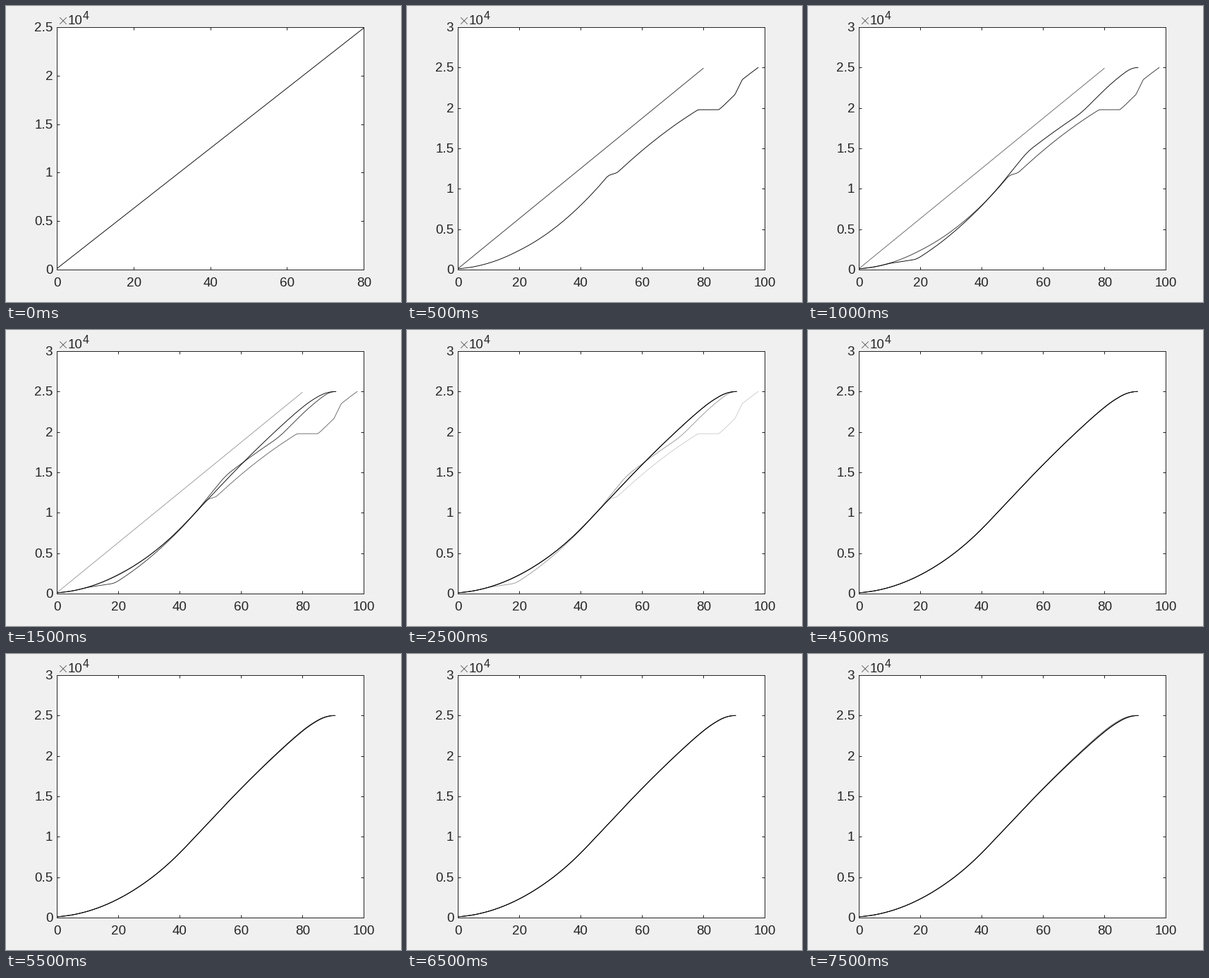
Animation of 560x420 px, one loop 8000 ms. Source, as a matplotlib script:

```python
import numpy as np
import matplotlib.pyplot as plt
from matplotlib.animation import FuncAnimation

W, H, DPI = 560, 420, 100
PX = 72 / DPI  # points per pixel
FRAMES, INTERVAL = 16, 500
LEFT, RIGHT, TOP, BOTTOM = 72, 507, 30, 374
INK = "#262626"
START, GOAL = 100, 25000
FADE = 0.2  # grey gained per step of age

plt.rcParams["font.family"] = "Liberation Sans"


def travel(*speed_keys, n=500):
    """Distance over time for a speed that is linear between (time, speed) keys."""
    times, speeds = zip(*speed_keys)
    t = np.linspace(0, times[-1], n)
    v = np.interp(t, times, speeds)
    d = np.append(0, np.cumsum((v[1:] + v[:-1]) / 2 * np.diff(t)))
    return t, START + d * (GOAL - START) / d[-1]


def steady():
    return np.array([0, 80]), np.array([START, GOAL - 100])


def stalling():
    return travel((0, 25), (18, 185), (22, 205), (46, 425), (48, 460),
                  (50, 100), (51.7, 150), (52.3, 345), (56, 340), (78, 235),
                  (78.7, 0), (84.9, 0), (85.3, 320), (87.5, 380), (90.1, 350),
                  (90.5, 770), (92.5, 790), (92.9, 300), (97.9, 275))


def uneven():
    return travel((0, 25), (9, 100), (11, 60), (17.5, 55), (20, 240),
                  (40, 390), (48, 470), (53, 465), (57, 290), (70, 255),
                  (75, 385), (80, 365), (87, 275), (91, 0))


def smooth(end):
    t, d = travel((0, 25), (30, 280), (42, 400), (53, 404), (75, 344),
                  (80, 310), (85.5, 208), (90.8, 0))
    late = np.clip((t - 50) / (t[-1] - 50), 0, None)
    return t + (end - t[-1]) * late, d


curves = ([steady(), stalling(), uneven()] + [smooth(90.8)] * 7
          + [smooth(90.5)] * 4 + [smooth(91.1)] * 2)

fig = plt.figure(figsize=(W / DPI, H / DPI), dpi=DPI, facecolor="#f0f0f0")
ax = fig.add_axes([LEFT / W, 1 - BOTTOM / H,
                   (RIGHT - LEFT) / W, (BOTTOM - TOP) / H])
ax.tick_params(direction="in", top=True, right=True, length=4.4 * PX,
               width=PX, color=INK, labelbottom=False, labelleft=False)
for spine in ax.spines.values():
    spine.set(linewidth=PX, edgecolor=INK)


def label(x, y, text="", ha="center", size=18.9):
    return fig.text(x / W, 1 - y / H, text, ha=ha, va="baseline",
                    fontsize=size * PX, color=INK)


x_labels = [label(0, 398) for _ in range(6)]
y_labels = [label(66.3, 0, ha="right") for _ in range(7)]
label(87.5, 26, "10", "left")
label(108.5, 19, "4", "left", 16)
for ends in ((16.5, 25.5), (25.5, 16.5)):
    fig.add_artist(plt.Line2D([76.5 / W, 85.5 / W], [1 - y / H for y in ends],
                              color="#505050", linewidth=0.8 * PX))

lines = [ax.plot(*curve, linewidth=0.9 * PX, zorder=2 + 0.01 * k)[0]
         for k, curve in enumerate(curves)]


def set_axes(x_max, y_max):
    x_ticks = np.arange(0, x_max + 1, 20)
    y_ticks = np.arange(0, y_max + 0.1, 0.5)
    ax.set(xlim=(0, x_max), ylim=(0, y_max * 1e4),
           xticks=x_ticks, yticks=y_ticks * 1e4)
    for text in x_labels + y_labels:
        text.set_text("")
    for text, v in zip(x_labels, x_ticks):
        text.set_text(f"{v:g}")
        text.set_x((LEFT + 0.5 + (RIGHT - LEFT) * v / x_max) / W)
    for text, v in zip(y_labels, y_ticks):
        text.set_text(f"{v:g}")
        y = BOTTOM - (BOTTOM - TOP) * v / y_max + 6
        text.set_y(1 - y / H)


def update(frame):
    set_axes(*((80, 2.5) if frame == 0 else (100, 3)))
    for k, line in enumerate(lines):
        age = frame - k
        line.set_visible(0 <= age < 5)
        line.set_color(str(np.clip(FADE * age, 0, 1)))
    return lines


anim = FuncAnimation(fig, update, frames=FRAMES, interval=INTERVAL,
                     init_func=lambda: update(0), repeat=True, repeat_delay=0)
plt.show()
```
